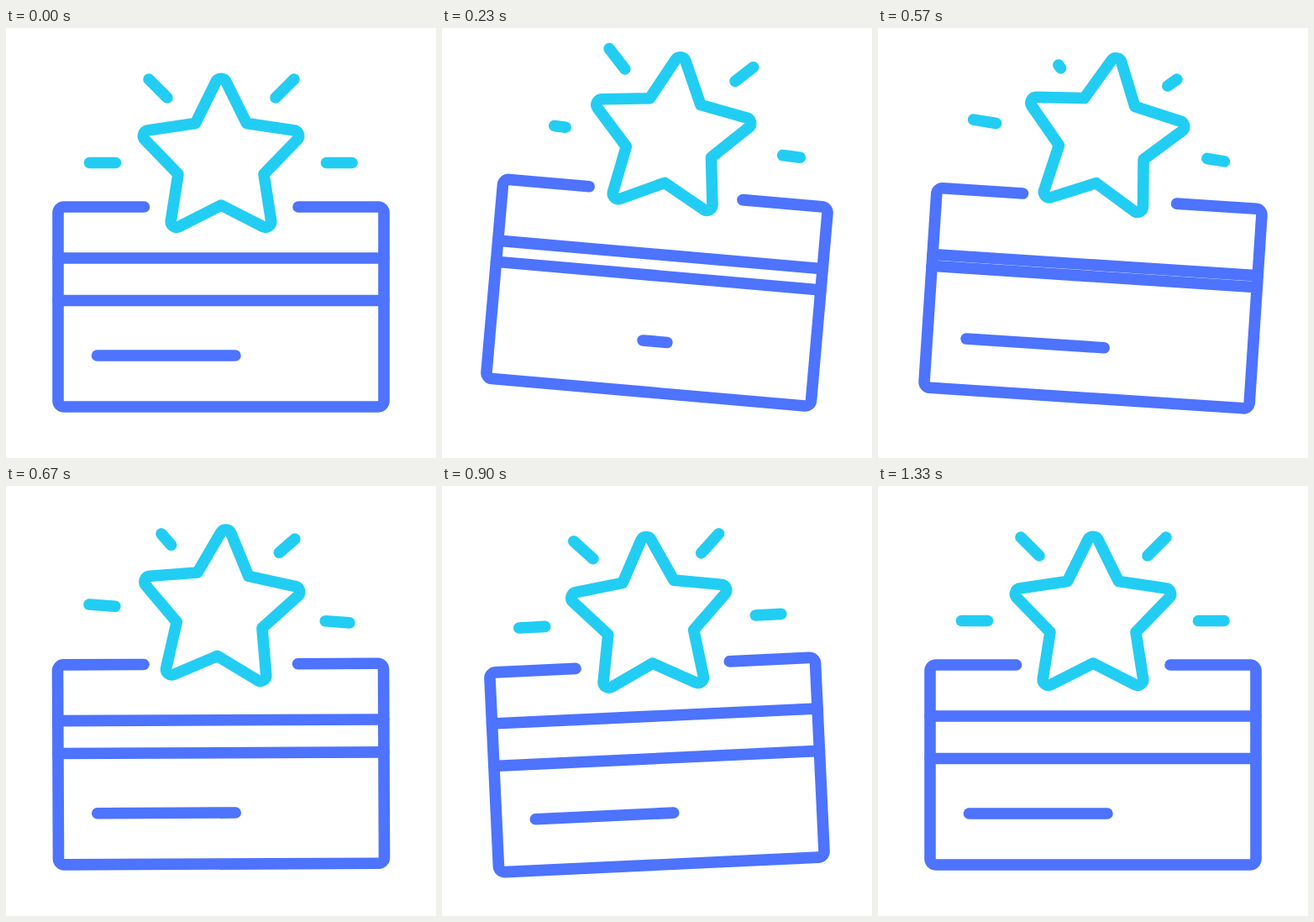
These frames come from a looping animation (512 by 512 pixels, 1.53 s). An HTML page:

```html
<!DOCTYPE html>
<html lang="en">
<head>
<meta charset="utf-8">
<title>Reward card</title>
<style>
  html, body { margin: 0; width: 100%; height: 100%; overflow: hidden; background: #fff; }
  svg { display: block; width: 100vw; height: 100vh; }
  path { fill: none; stroke-width: 13.6; stroke-linecap: round; stroke-linejoin: round; }
  #card { stroke: #4d73ff; }
  #star { stroke: #22cdf3; }
</style>
</head>
<body>
<svg viewBox="0 0 512 512">
  <g id="all">
    <g id="card">
      <path d="M164.5 213H69a7 7 0 0 0-7 7V444a7 7 0 0 0 7 7H443a7 7 0 0 0 7-7V220a7 7 0 0 0-7-7H348"/>
      <path id="bandA" d="M62 299.2H450"/>
      <path id="bandB" d="M62 299.2H450"/>
      <path id="line"/>
    </g>
    <g id="star">
      <path d="M225.5 113.5L250 64A6.7 6.7 0 0 1 262 64L286.5 113.5L342 121.7A6.7 6.7 0 0 1 346.7 133
        L307 174L315.7 229.8A6.7 6.7 0 0 1 306.2 236.6L256 211L205.8 236.6A6.7 6.7 0 0 1 196.3 229.8
        L205 174L165.3 133A6.7 6.7 0 0 1 170 121.7Z"/>
      <path id="rayA"/>
      <path id="rayB"/>
      <path id="rayC"/>
      <path id="rayD"/>
    </g>
  </g>
</svg>
<script>
const LOOP = 1530;
const $ = id => document.getElementById(id);

// Keys are [frame, value] at 30 frames per second.
const tilt = [[0, 0], [9, 5.7], [14, 5.7], [24.5, -4.1], [32, 1.4], [40, 0]];
const lift = [[0, 0], [6, -16.8], [14, -16.8], [21, 0]];
const gap = [[0, 50.5], [14, 0], [22.7, 50.5]];
const starTilt = [[3, 0], [12, 5.7], [17, 5.7], [26.5, -0.4], [33, 0.6], [40, 0]];
const starLift = [[3, 0], [10, -16.7], [16, -16.7], [23.5, 0]];

// Strokes that are wiped away and then drawn again: id, x1, y1, x2, y2, start, length.
const wipes = [
  ["line", 108.5, 390, 273, 390, 1, 13.6],
  ["rayA", 99.5, 160.5, 130.5, 160.5, 0, 20],
  ["rayB", 381.5, 160.5, 412, 160.5, 2, 20],
  ["rayC", 321, 83, 343, 61, 4, 20],
  ["rayD", 192, 83, 170, 61, 6, 20]
];

const ease = u => u * u * (3 - 2 * u);

function at(keys, f) {
  if (f <= keys[0][0]) return keys[0][1];
  for (let i = 1; i < keys.length; i++) {
    const [f0, v0] = keys[i - 1], [f1, v1] = keys[i];
    if (f < f1) return v0 + (v1 - v0) * ease((f - f0) / (f1 - f0));
  }
  return keys[keys.length - 1][1];
}

function wipe([id, x1, y1, x2, y2, start, length], f) {
  const p = at([[start, 0], [start + length, 2]], f);
  const [a, b] = p < 1 ? [p, 1] : [0, p - 1];
  const point = k => `${x1 + (x2 - x1) * k} ${y1 + (y2 - y1) * k}`;
  $(id).setAttribute("d", b - a < 0.02 ? "" : `M${point(a)}L${point(b)}`);
}

function move(id, x, y, turn = "") {
  $(id).setAttribute("transform", `translate(${x} ${y}) ${turn}`);
}

function draw(ms) {
  const f = Math.floor(((ms % LOOP) * 3 + 10.5) / 100);
  const half = at(gap, f) / 2;
  move("all", 0, at(lift, f), `rotate(${at(tilt, f)} 256 332)`);
  move("star", 0, at(starLift, f), `rotate(${at(starTilt, f)} 256 158)`);
  move("bandA", 0, -half);
  move("bandB", 0, half);
  wipes.forEach(w => wipe(w, f));
}

function tick(now) {
  draw(now);
  requestAnimationFrame(tick);
}
draw(0);
requestAnimationFrame(tick);
</script>
</body>
</html>
```
